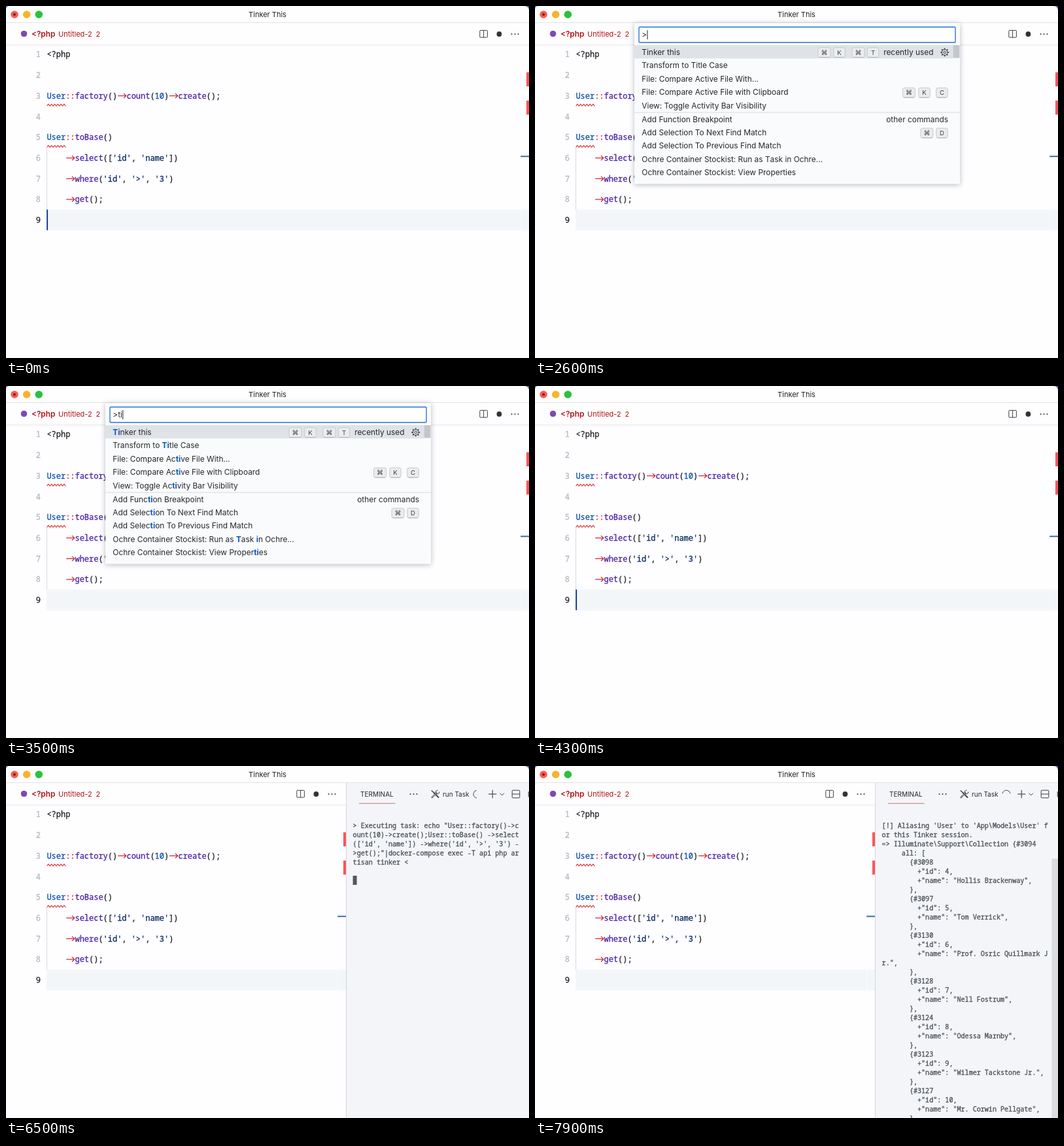
Animation of 800x539 px, one loop 8 s. Source, as an HTML page with a canvas:

```html
<!DOCTYPE html>
<html lang="en">
<head>
<meta charset="utf-8">
<title>Tinker This</title>
<style>
html, body { margin: 0; width: 100%; height: 100%; overflow: hidden; background: #fefdff; }
canvas { display: block; width: 800px; height: 539px; }
</style>
</head>
<body>
<canvas id="stage"></canvas>
<script>
const W = 800, H = 539, LOOP = 8000;
const OPEN = 2500, TYPE_T = 2900, TYPE_I = 3100, CLOSE = 3900;
const PANEL = 4400, ALIAS = 7000, RESULT = 7500;
const SANS = 'Inter, "Open Sans", sans-serif';
const MONO = '"Noto Sans Mono", "DejaVu Sans Mono", monospace';
const INK = '#1f2429', RED = '#d3202c', BLUE = '#0b4fae', PURPLE = '#4a22a4', NAVY = '#06295e';

const canvas = document.getElementById('stage');
const c = canvas.getContext('2d');
const dpr = window.devicePixelRatio || 1;
canvas.width = W * dpr;
canvas.height = H * dpr;

function rect(x, y, w, h, color) {
  c.fillStyle = color;
  c.fillRect(x, y, w, h);
}

function dot(x, y, r, color) {
  c.fillStyle = color;
  c.beginPath();
  c.arc(x, y, r, 0, Math.PI * 2);
  c.fill();
}

function line(points, color, width = 1) {
  c.strokeStyle = color;
  c.lineWidth = width;
  c.beginPath();
  points.forEach(([x, y], i) => i ? c.lineTo(x, y) : c.moveTo(x, y));
  c.stroke();
}

function box(x, y, w, h, color, width = 1) {
  c.strokeStyle = color;
  c.lineWidth = width;
  c.beginPath();
  c.roundRect(x, y, w, h, 1);
  c.stroke();
}

// Draws text and returns the x where it ends.
function text(s, x, y, font, color, align = 'left') {
  c.font = font;
  c.fillStyle = color;
  c.textAlign = align;
  c.fillText(s, x, y);
  return x + c.measureText(s).width;
}

// Code text, slightly thickened.
function code(s, x, y, size, color, align = 'left') {
  text(s, x, y, `${size}px ${MONO}`, color, align);
  c.strokeStyle = color;
  c.lineWidth = .3;
  c.strokeText(s, x, y);
}

const sans = (size, weight = 400) => `${weight} ${size}px ${SANS}`;

function dots(x, y) {
  for (let i = -1; i <= 1; i++) dot(x + i * 5, y, 1, '#333');
}

function titleBar() {
  rect(0, 0, W, 26, '#fefefe');
  rect(0, 25, W, 1, '#e3e3e6');
  c.fillStyle = '#3c679f';
  c.beginPath();
  c.moveTo(0, 0); c.lineTo(5, 0); c.quadraticCurveTo(0, 0, 0, 5);
  c.moveTo(W, 0); c.lineTo(W - 7, 0); c.quadraticCurveTo(W, 0, W, 8);
  c.fill();
  dot(13, 13, 5.8, '#fc5c57');
  dot(13, 13, 2, '#7d1612');
  dot(31.7, 13, 5.8, '#f8b42d');
  dot(50.3, 13, 5.8, '#2ac13c');
  text('Tinker This', 400, 17, sans(11), '#222', 'center');
}

function tabBar(edge) {
  rect(0, 26, edge, 33, '#fffefe');
  rect(0, 58.5, edge, 1, '#e9ecef');
  rect(0, 59.5, edge, 2, '#f7f7f9');
  dot(27.5, 42.5, 4.8, '#7d4bb3');
  text('<?php', 39, 47, sans(11.8, 600), '#b01218');
  text('Untitled-2', 80, 47, sans(11), '#b01218');
  text('2', 137.5, 47, sans(11), '#b01218');
  const x = edge - 69.5;
  box(x - 5.7, 37.3, 11.6, 10.8, '#3a3f44');
  line([[x + .1, 37.3], [x + .1, 48.1]], '#3a3f44');
  dot(x + 23.9, 43, 3.9, '#333');
  dots(x + 48, 43);
}

const CODE = [
  [['<?php', INK]],
  [],
  [['User', BLUE], ['::', RED], ['factory', PURPLE], ['()', INK], ['->'], ['count', PURPLE], ['(', INK],
    ['10', BLUE], [')', INK], ['->'], ['create', PURPLE], ['();', INK]],
  [],
  [['User', BLUE], ['::', RED], ['toBase', PURPLE], ['()', INK]],
  [['    '], ['->'], ['select', PURPLE], ['([', INK], ["'id'", NAVY], [', ', INK], ["'name'", NAVY], ['])', INK]],
  [['    '], ['->'], ['where', PURPLE], ['(', INK], ["'id'", NAVY], [', ', INK], ["'>'", NAVY], [', ', INK],
    ["'3'", NAVY], [')', INK]],
  [['    '], ['->'], ['get', PURPLE], ['();', INK]],
  []
];
const CODE_SIZE = 11.97, CODE_X = 62.4, PITCH = 31.72;

function arrow(x, y) {
  line([[x + 1, y], [x + 13.6, y]], RED, 1.2);
  line([[x + 9.8, y - 3.6], [x + 13.6, y], [x + 9.8, y + 3.6]], RED, 1.2);
}

function squiggle(y) {
  const points = [];
  for (let x = 62.5; x <= 91.5; x += .5) points.push([x, y + 1.3 * Math.cos((x - 62.5) * Math.PI / 2.4)]);
  line(points, '#e0352f', 1.2);
}

function editor(edge, caret, slider) {
  rect(0, 59, edge, H - 59, '#fefdff');
  tabBar(edge);
  rect(62, 311.7, edge - 62, 31.8, '#f3f6f8');
  rect(edge - 13, 311.7, 1, 31.8, '#f9fafc');
  if (slider > 0) {
    c.globalAlpha = slider;
    rect(edge - 12.8, 60, 12.8, 357.5, '#eff2f5');
    c.globalAlpha = 1;
  }
  rect(62, 216, 1, 96, '#d6dde3');
  CODE.forEach((tokens, i) => {
    const y = 78.4 + i * PITCH;
    code(String(i + 1), 53, y, CODE_SIZE, i === 8 ? INK : '#b6babd', 'right');
    let x = CODE_X;
    for (const [s, color] of tokens) {
      if (s === '->') arrow(x, y - 4.3);
      else if (color) code(s, x, y, CODE_SIZE, color);
      x += s.length * CODE_SIZE * .6;
    }
  });
  squiggle(151.7);
  squiggle(214.9);
  if (caret) rect(62.2, 311.7, 1.9, 31.6, '#07398c');
  rect(edge - 4, 101.5, 4, 21.5, '#fa5659');
  rect(edge - 4, 144.8, 4, 21.5, '#fa5659');
  rect(edge - 12.8, 229.3, 12.8, 2, '#3a6cb0');
}

// Matched letters stand in brackets; keys are [label, centre x].
const COMMANDS = [
  { s: '[Ti]nker this', y: 70.5, keys: [['⌘', 442.5], ['K', 465.5], ['⌘', 494.5], ['T', 517]], note: ['recently used', 609.5] },
  { s: 'Transform to [Ti]tle Case', y: 91 },
  { s: 'File: Compare Ac[ti]ve File With...', y: 111.5 },
  { s: 'File: Compare Ac[ti]ve File with Clipboard', y: 132, keys: [['⌘', 572], ['K', 595.5], ['C', 622.5]] },
  { s: 'View: Toggle Ac[ti]vity Bar Visibility', y: 152.7 },
  { s: 'Add Func[ti]on Breakpoint', y: 174, note: ['other commands', 632] },
  { s: 'Add Selec[ti]on To Next Find Match', y: 193.8, keys: [['⌘', 599.5], ['D', 622.5]] },
  { s: 'Add Selec[ti]on To Previous Find Match', y: 214.2 },
  { s: 'Ochre Container Stockist: Run as [T]ask [i]n Ochre...', y: 234.8 },
  { s: 'Ochre Container Stockist: View Proper[ti]es', y: 255.2 }
];
const ITEM_SIZE = 11.9;

function keycap(label, x, y) {
  const w = label === '⌘' ? 19 : 17.5;
  c.fillStyle = '#ebecee';
  c.beginPath();
  c.roundRect(x - w / 2, y - 7.2, w, 14.8, 2.5);
  c.fill();
  c.strokeStyle = '#c6c9cc';
  c.lineWidth = 1;
  c.stroke();
  rect(x - w / 2 + 1.5, y + 7.2, w - 3, .8, '#adb0b4');
  const font = label === '⌘' ? '10px "DejaVu Sans", sans-serif' : sans(9.6);
  text(label, x, y + 3.7, font, '#3b3e41', 'center');
}

function gear(x, y) {
  for (let i = 0; i < 8; i++) {
    const a = i * Math.PI / 4, u = Math.cos(a), v = Math.sin(a);
    line([[x + u * 4.4, y + v * 4.4], [x + u * 6.4, y + v * 6.4]], '#3d4145', 1.8);
  }
  for (const r of [4.4, 1.8]) {
    c.lineWidth = 1;
    c.beginPath();
    c.arc(x, y, r, 0, Math.PI * 2);
    c.stroke();
  }
}

function command({ s, y, keys = [], note }, typed) {
  const base = y + 4.2, ink = '#24292e';
  let x = 163.3, matched = 0;
  s.split(/[\[\]]/).forEach((part, i) => {
    const hit = i % 2 ? Math.max(0, Math.min(part.length, typed - matched)) : 0;
    if (i % 2) matched += part.length;
    if (hit) x = text(part.slice(0, hit), x, base, sans(ITEM_SIZE, 700), '#0b57c0');
    x = text(part.slice(hit), x, base, sans(ITEM_SIZE), ink);
  });
  for (const [label, kx] of keys) keycap(label, kx, y + .5);
  if (note) text(note[0], note[1], base, sans(ITEM_SIZE), ink, 'right');
}

function palette(typed) {
  c.save();
  c.shadowColor = 'rgba(0,0,0,.26)';
  c.shadowBlur = 8 * dpr;
  c.shadowOffsetY = dpr;
  rect(152, 26, 498, 246.5, '#fafbfc');
  c.restore();
  rect(158.5, 32, 485, 24, '#fff');
  box(159, 32.3, 484, 23.4, '#2b74d6', 1.4);
  const end = text('>' + 'ti'.slice(0, typed), 163.3, 48.3, sans(ITEM_SIZE), '#24292e');
  rect(end + .3, 37, 1, 14, '#222');
  rect(152, 60, 487.5, 20.3, '#dfe3e8');
  rect(639.5, 60, 10, 19.5, '#c3c7cc');
  rect(152, 162.5, 498, 1, '#d8dce0');
  for (const item of COMMANDS) command(item, typed);
  gear(626.7, 70.9);
}

const TASK = [
  '',
  '> Executing task: echo "User::factory()->count(10)->create();User::toBase() ->select([\'id\', \'name\']) ' +
    '->where(\'id\', \'>\', \'3\') ->get();"|docker-compose exec -T api php artisan tinker <',
  ''
];
const NOTICE = "[!] Aliasing 'User' to 'App\\Models\\User' for this Tinker session.";
const PEOPLE = [
  [3098, 'Hollis Brackenway'], [3097, 'Tom Verrick'], [3130, 'Prof. Osric Quillmark Jr.'],
  [3128, 'Nell Fostrum'], [3124, 'Odessa Marnby'], [3123, 'Wilmer Tackstone Jr.'], [3127, 'Mr. Corwin Pellgate']
];

const pad = (n, s) => ' '.repeat(n) + s;
const wrap = rows => rows.flatMap(s => s.match(/.{1,42}/g) || ['']);

function dump() {
  const rows = ['', NOTICE, '=> Illuminate\\Support\\Collection {#3094', pad(5, 'all: [')];
  PEOPLE.forEach(([ref, name], i) => rows.push(
    pad(7, `{#${ref}`), pad(9, `+"id": ${i + 4},`), pad(9, `+"name": "${name}",`), pad(7, '},')));
  return wrap(rows);
}

const WAITING = wrap(TASK), ALIASED = wrap([...TASK, NOTICE]), DUMPED = dump();

// Spinner pose: time against turned degrees.
const TURNS = [[4400, -215], [5200, 105], [6500, 630], [7900, 1080], [8300, 1208]];

function spinAngle(t) {
  const i = Math.max(1, TURNS.findIndex(k => t < k[0]));
  const [t0, a0] = TURNS[i - 1], [t1, a1] = TURNS[i];
  return (a0 + (a1 - a0) * (t - t0) / (t1 - t0)) * Math.PI / 180;
}

function spinner(t) {
  const top = spinAngle(t) - Math.PI / 2, half = 1.41;
  c.strokeStyle = '#4a4e53';
  c.lineWidth = 1;
  c.beginPath();
  c.arc(721, 43.2, 6.1, top - half, top + half);
  c.stroke();
}

function toolsIcon() {
  const ink = '#34383c';
  line([[654, 40.5], [662, 48.5]], ink, 1.8);
  line([[651, 48.7], [659, 40.8]], ink, 2.2);
  line([[651.5, 48.2], [658.5, 41.3]], '#f3f5f8', .9);
  c.lineWidth = 1;
  c.strokeStyle = ink;
  c.beginPath();
  c.arc(660, 40, 2.8, -.2, 4.9);
  c.stroke();
  line([[650.8, 37.5], [654, 40.5]], ink, 1.4);
}

function terminal(t) {
  const ink = '#3a3f44';
  rect(520, 26, 280, H - 26, '#f3f5f8');
  rect(520, 26, 1, H - 26, '#d3d8dd');
  text('TERMINAL', 542, 46.6, sans(10), '#24292e');
  rect(540, 56.8, 55.5, 1, '#cc7771');
  dots(623.5, 43);
  toolsIcon();
  text('run Task', 668, 46.6, sans(10), '#24292e');
  spinner(t);
  line([[738, 43], [750.3, 43]], ink, 1.1);
  line([[744.2, 36.8], [744.2, 49.2]], ink, 1.1);
  line([[755.6, 41.6], [758.8, 44.8], [762, 41.6]], ink);
  box(774.2, 37.2, 11.6, 11.6, ink);
  line([[774.2, 43], [785.8, 43]], ink);
  line([[799.3, 39], [799.3, 47.5]], ink);

  const rows = t >= RESULT ? DUMPED : t >= ALIAS ? ALIASED : WAITING;
  rows.forEach((s, i) => code(s, 530.6, 80.9 + i * 14, 10.08, '#484d53'));
  if (t < RESULT) rect(530.6, 70 + rows.length * 14, 6, 14, '#53575c');
  else rect(790.5, 142, 9.5, H - 142, '#d9dce0');
}

function caretOn(t) {
  if (t < OPEN) return t % 1000 < 500;
  return t >= CLOSE && t < PANEL;
}

function draw(now) {
  const t = Math.floor(now % LOOP / 100) * 100;
  const split = t >= PANEL;
  c.setTransform(dpr, 0, 0, dpr, 0, 0);
  editor(split ? 520 : W, caretOn(t), split ? Math.min(1, 1 - (t - 5300) / 800) : 0);
  titleBar();
  if (split) terminal(t);
  if (t >= OPEN && t < CLOSE) palette((t >= TYPE_T) + (t >= TYPE_I));
}

const start = performance.now();
function tick() {
  draw(performance.now() - start);
  requestAnimationFrame(tick);
}
tick();
</script>
</body>
</html>
```
